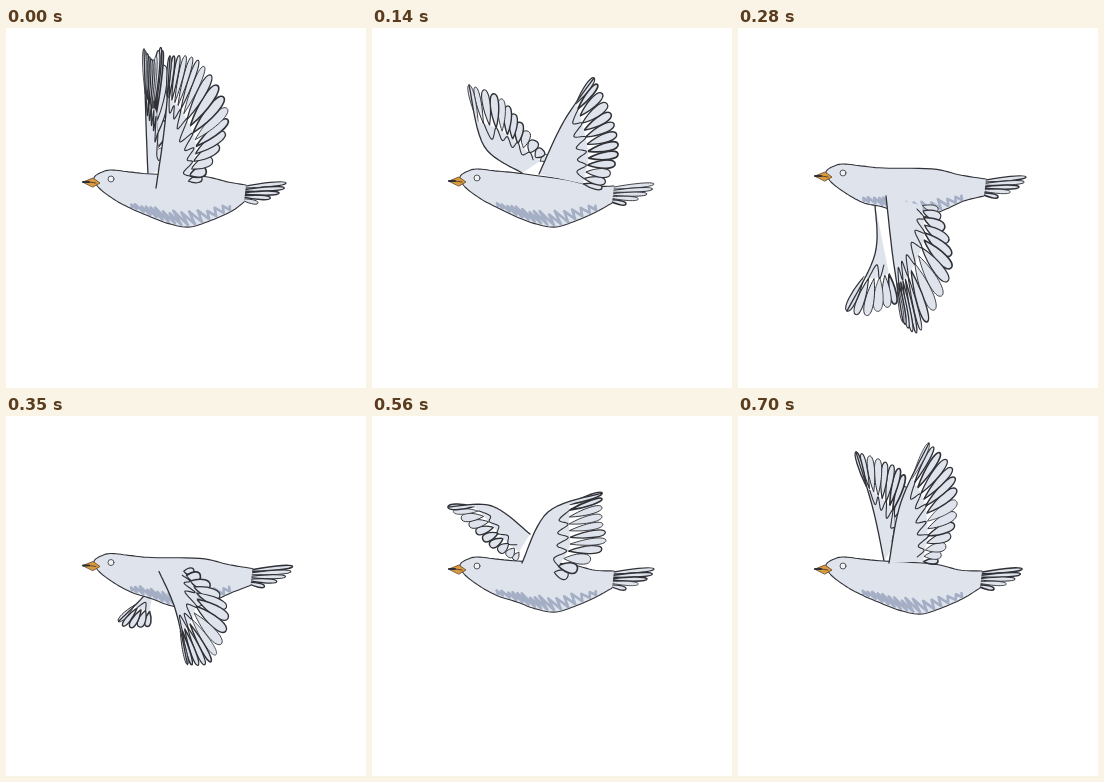
These frames come from a looping animation (360 by 360 pixels, 0.77 s). An HTML page:

```html
<!DOCTYPE html>
<html lang="en">
<head>
<meta charset="utf-8">
<title>Flying bird</title>
<style>
  html, body { margin: 0; width: 100%; height: 100%; overflow: hidden; background: #fff; }
  #strip { display: block; width: 3960px; height: 360px; animation: fly 770ms steps(11) infinite; }
  @keyframes fly { to { transform: translateX(-3960px); } }
  path, circle { fill: none; stroke: #303137; stroke-linecap: round; stroke-linejoin: round; }
  .skin { fill: #dfe3ec; }
  .patch { fill: #dfe3ec; stroke: none; }
  .shade { stroke: #8592b0; opacity: .65; }
  .eye { fill: #f1f2f5; stroke: #55565c; }
  .beak { fill: #dd9a3c; stroke: #6a5035; }
</style>
</head>
<body>
<svg id="strip" viewBox="0 0 3960 360"></svg>
<script>
const STEPS = 11;

// Key poses. body: beak y, back y, belly y. tail: upper tip.
// Wings: root, bend and tip of the leading edge, then three points down the feather rim.
const keys = [
  { step: 0, body: [154, 148, 199], tail: [280, 155],
    far: '142,147 140,95 138,21 147,32 157,26 158,140',
    near: '150,160 159,95 164,28 194,34 222,88 196,150' },
  { step: 2, body: [153, 152, 199], tail: [282, 156],
    far: '150,145 112,118 97,57 127,69 150,97 176,128',
    near: '167,146 192,93 222,50 239,86 246,126 230,160' },
  { step: 3, body: [150, 141, 186], tail: [284, 150],
    far: '140,176 113,201 87,223 110,220 140,207 168,192',
    near: '146,159 178,205 233,256 252,240 255,212 226,172' },
  { step: 4, body: [148, 141, 189], tail: [288, 149],
    far: '137,176 137,226 109,283 125,288 143,282 157,276',
    near: '148,168 155,230 165,294 183,302 213,240 200,182' },
  { step: 6, body: [151, 144, 196], tail: [285, 152],
    far: '162,143 142,130 116,128 113,134 118,140 125,145',
    near: '158,143 184,158 198,203 230,186 230,150 176,129' },
  { step: 8, body: [153, 148, 196], tail: [282, 153],
    far: '158,118 120,90 76,91 97,109 118,130 142,144',
    near: '150,147 176,96 230,77 230,103 232,130 196,160' },
  { step: 10, body: [153, 148, 198], tail: [284, 153],
    far: '146,145 135,93 118,36 145,45 167,62 162,120',
    near: '151,147 163,86 191,27 215,55 217,105 200,145' }
];
for (const k of keys) {
  for (const w of ['far', 'near']) k[w] = k[w].split(' ').map(p => p.split(',').map(Number));
}

let seed = 1;
const rand = (lo, hi) => {
  seed = seed * 16807 % 2147483647;
  return lo + (hi - lo) * seed / 2147483647;
};

// Works on numbers and nested arrays alike
const mix = (a, b, t) => Array.isArray(a) ? a.map((v, i) => mix(v, b[i], t)) : a + (b - a) * t;
const dist = (a, b) => Math.hypot(b[0] - a[0], b[1] - a[1]);
const times = (n, fn) => Array.from({ length: n }, (_, i) => fn(i, n > 1 ? i / (n - 1) : 0));

// Catmull-Rom point at u in 0..1
function spline(pts, u) {
  const last = pts.length - 1, i = Math.min(last - 1, Math.floor(u * last)), t = u * last - i;
  const [a, b, c, d] = [-1, 0, 1, 2].map(k => pts[Math.max(0, Math.min(last, i + k))]);
  return [0, 1].map(k => b[k] + t / 2 * (c[k] - a[k] +
    t * (2 * a[k] - 5 * b[k] + 4 * c[k] - d[k] + t * (3 * (b[k] - c[k]) + d[k] - a[k]))));
}
const smooth = pts => times(pts.length * 7, (_, u) => spline(pts, u));
const line = pts => 'M' + pts.map(p => p.map(v => v.toFixed(1))).join('L');
const path = (cls, d, width = 1.1) => `<path class="${cls}" d="${d}" stroke-width="${width}"/>`;

function feather(base, tip, w) {
  const len = dist(base, tip) || 1;
  const nx = (base[1] - tip[1]) / len * w, ny = (tip[0] - base[0]) / len * w;
  const off = (t, s) => mix(base, tip, t).map((v, k) => (v + s * [nx, ny][k]).toFixed(1));
  return path('skin', `M${off(0, 0)}C${off(.5, 1)} ${off(1, 1)} ${off(1, 0)}` +
    `C${off(1, -1)} ${off(.5, -1)} ${off(0, 0)}`, rand(.8, 1.7).toFixed(1));
}

function wing(pts) {
  const [root, bend] = pts, lead = smooth(pts.slice(0, 3)), rim = pts.slice(2);
  const length = rim.slice(1).reduce((sum, p, i) => sum + dist(rim[i], p), 0);
  const n = Math.max(5, Math.round(length / 10) + 1);
  const heel = mix(root, rim[3], .5);
  const tips = times(n, (_, u) => spline(rim, u));
  const hubs = times(n, (_, u) => mix(bend, heel, u));
  const bases = tips.map((p, i) => mix(p, hubs[i], .6));
  const feathers = tips.map((p, i) => {
    const gap = dist(p, tips[i ? i - 1 : 1]);
    return feather(bases[i], p, Math.max(2.5, Math.min(7, gap * .55)));
  });
  const scribble = bases.slice(1, -1).map((p, i) => mix(p, hubs[i + 1], i % 2 ? rand(.4, .6) : rand(-.1, .1)));
  return feathers.reverse().join('') +
    path('patch', line([...lead, ...bases])) +
    path('', line(lead), 1.3) +
    path('', line(smooth(scribble)));
}

function tail([x, y]) {
  return times(5, (_, u) => feather([x - 50 + 4 * u, y + 5 + 11 * u], [x - 28 * u * u, y + 20 * u], 2.8)).join('');
}

function body([h, back, belly], [tx, ty]) {
  const top = [[tx - 40, ty + 2], [222, back + 6], [195, back], [145, h - 8], [124, h - 10],
    [106, h - 12], [96, h - 10], [88, h - 4]];
  const under = [[93, h + 6], [109, h + 18], [126, h + 27], [145, belly - 10], [164, belly - 3],
    [184, belly], [206, belly - 7], [226, belly - 16], [tx - 42, ty + 19]];
  const band = times(32, (i, u) => {
    const [x, y] = spline(under.slice(2, 8), u), size = i % 2 ? (3 + 9 * Math.sin(Math.PI * u)) * rand(.8, 1.2) : 0;
    return [x - size * .8, y - 2 - size];
  });
  return path('skin', line(smooth([...top, ...under]))) + path('shade', line(band), 2.6);
}

function head(y) {
  return path('beak', `M77,${y}L87,${y - 4}L94,${y + 1}L87,${y + 5}Z`, .9) +
    path('', `M77,${y}L83,${y}`, 2) + path('', `M83,${y}L90,${y + 1}`, .8) +
    `<circle class="eye" cx="105" cy="${y - 3}" r="3"/>`;
}

function pose(step) {
  const i = Math.max(1, keys.findIndex(k => k.step >= step)), a = keys[i - 1], b = keys[i];
  const t = (step - a.step) / (b.step - a.step);
  const at = part => mix(a[part], b[part], t);
  return wing(at('far')) + tail(at('tail')) + body(at('body'), at('tail')) + head(at('body')[0]) + wing(at('near'));
}

document.getElementById('strip').innerHTML =
  times(STEPS, i => `<g transform="translate(${i * 360})">${pose(i)}</g>`).join('');
</script>
</body>
</html>
```
